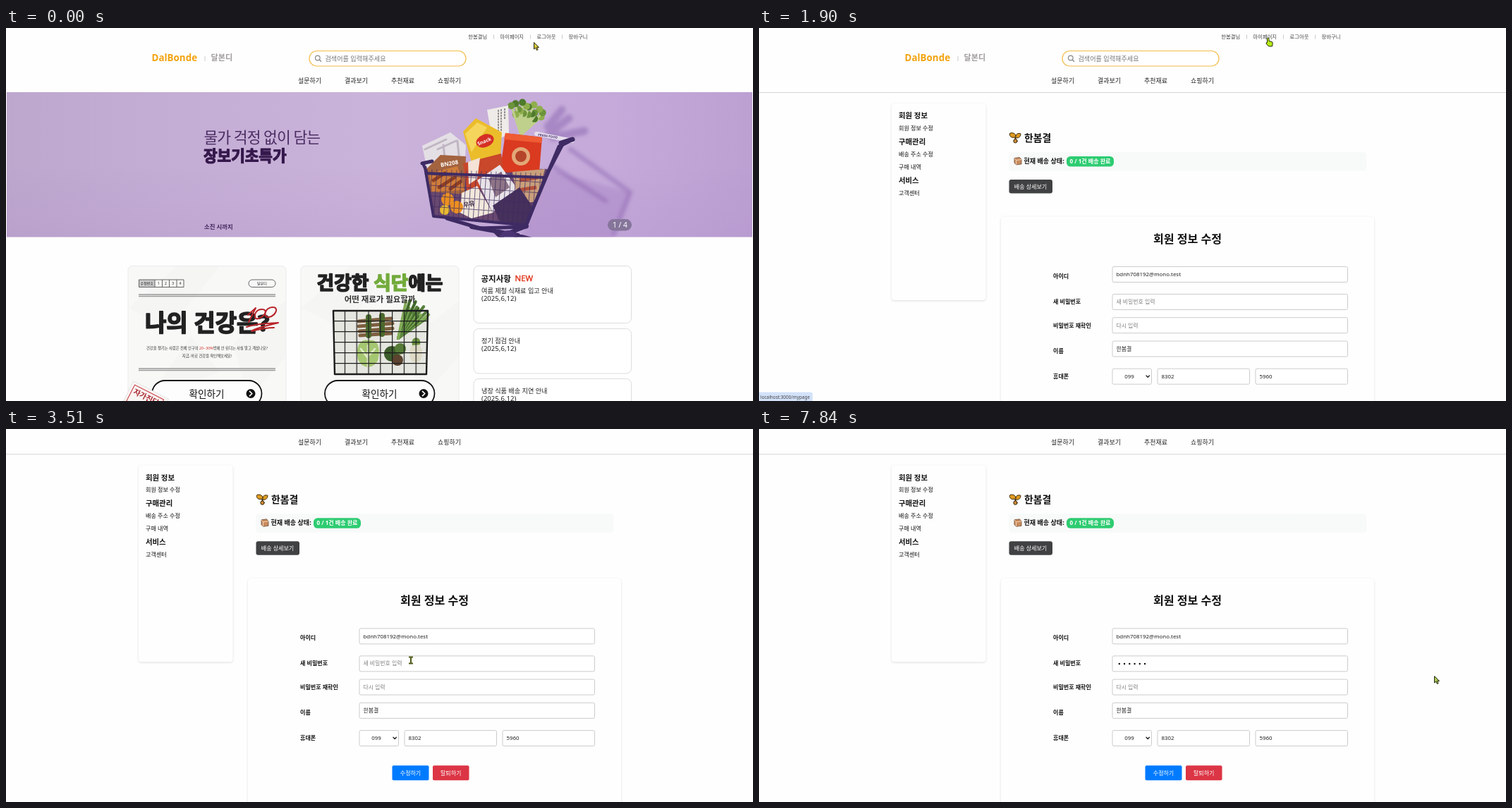
Write an HTML page that moves like this. It is 1059 by 529 pixels and loops after 8 s.

```html
<!DOCTYPE html>
<html lang="ko">
<head>
<meta charset="utf-8">
<style>
html, body { margin: 0; width: 100%; height: 100%; overflow: hidden; background: #fefefe; }
svg { display: block; width: 1059px; height: 529px; font-family: "Noto Sans", "Noto Sans CJK KR", sans-serif; }
.b { font-weight: 700; }
.mid { text-anchor: middle; }
.black { font-weight: 900; stroke-width: 1.7; stroke-linejoin: round; }
.field { fill: #fff; stroke: #ccc; }
.line { fill: none; stroke-linecap: round; stroke-linejoin: round; }
.soft { fill: #fefefe; filter: drop-shadow(0 1px 1.5px rgba(0, 0, 0, .13)); }
</style>
</head>
<body>
<svg viewBox="0 0 1059 529">
<defs>
  <linearGradient id="lilac">
    <stop offset="0" stop-color="#bda7cd"/><stop offset=".2" stop-color="#c3add4"/>
    <stop offset=".5" stop-color="#cab3da"/><stop offset=".8" stop-color="#c5aada"/><stop offset="1" stop-color="#bca0d2"/>
  </linearGradient>
  <linearGradient id="floor" x2="0" y2="1">
    <stop offset=".5" stop-color="#9a72bd" stop-opacity="0"/><stop offset="1" stop-color="#9a72bd" stop-opacity=".12"/>
  </linearGradient>
  <pattern id="bars" width="7" height="15" patternUnits="userSpaceOnUse" patternTransform="rotate(4)">
    <path d="M0 0V15M0 0H7" stroke="#3d2a5e" stroke-width="2" fill="none"/>
  </pattern>
  <pattern id="wires" x="463" y="400" width="16.8" height="15" patternUnits="userSpaceOnUse">
    <path d="M0 0V15M0 0H17" stroke="#1c1c1c" stroke-width="2.4" fill="none"/>
  </pattern>
  <filter id="blur"><feGaussianBlur stdDeviation="2.5"/></filter>
  <clipPath id="bannerClip"><path d="M1 91H1058V296.5H1Z"/></clipPath>
  <g id="paper">
    <rect x=".5" y=".5" width="224" height="220" rx="6" fill="#f8f8f7" stroke="#ebebeb"/>
    <path d="M1 60 70 1H130L60 90ZM150 110 224 50V130L170 190ZM20 200 90 100 130 150Z" fill="#f3f3f2" opacity=".6"/>
    <rect x="34.5" y="163" width="155.5" height="37" rx="18.5" fill="#fdfdfd" stroke="#111" stroke-width="1.8"/>
    <text x="112" y="186.5" font-size="13.6" class="mid" fill="#111">확인하기</text>
    <circle cx="174.5" cy="181.5" r="6.500" fill="#111"/>
    <path d="M173 178.3 176.3 181.5 173 184.7" class="line" stroke="#fff" stroke-width="1.7"/>
  </g>
</defs>

<g id="scroller">
  <g id="header">
    <g font-size="7.3" fill="#444">
      <text x="655.3" y="15">한봄결님</text><text x="700.5" y="15">마이페이지</text>
      <text x="752.5" y="15">로그아웃</text><text x="797.5" y="15">장바구니</text>
    </g>
    <path d="M691.5 9.5V15.5M743.5 9.5V15.5M788.5 9.5V15.5M282 40V47" stroke="#ccc"/>
    <text x="206.5" y="46.5" font-size="13.4" class="b" fill="#f2a30f">DalBonde</text>
    <text x="290.5" y="46.3" font-size="11.1" class="b" fill="#a09b9b">달본디</text>
    <rect x="430" y="32.5" width="222" height="21.5" rx="10.7" fill="#fff" stroke="#f3bd4b" stroke-width="1.2"/>
    <circle cx="441.8" cy="42.5" r="3.3" fill="none" stroke="#888" stroke-width="1.2"/>
    <path d="M444.2 45 447 47.8" stroke="#888" stroke-width="1.3"/>
    <text x="452.5" y="46.7" font-size="9.1" fill="#757575">검색어를 입력해주세요</text>
    <g font-size="8.95" fill="#222">
      <text x="414" y="77.7">설문하기</text><text x="480" y="77.7">결과보기</text>
      <text x="546" y="77.7">추천재료</text><text x="612" y="77.7">쇼핑하기</text>
    </g>
  </g>

  <g id="home">
    <g clip-path="url(#bannerClip)">
      <rect x="1" y="91" width="1057" height="206" fill="url(#lilac)"/>
      <rect x="1" y="91" width="1057" height="206" fill="url(#floor)"/>
      <g filter="url(#blur)" class="line" stroke="#8a63b0">
        <path d="M765 200 885 233 858 300H730Z" fill="#9670b8" stroke="none" opacity=".28"/>
        <path d="M800 172 885 233 862 292M775 196 850 245" stroke-width="7" opacity=".45"/>
        <path d="M770 150 798 128M768 140 788 116M775 155 820 146" stroke-width="11" opacity=".5"/>
      </g>
      <path d="M592 196 768 200 738 280 606 267Z" fill="#69486f"/>
      <g id="celery" class="line"></g>
      <path d="M682 116 712 110 713 150 690 162Z" fill="#eeebe8"/>
      <path d="M698 116V146M702 115V146M707 114V130" stroke="#777" stroke-width="1.5" stroke-dasharray="3 1"/>
      <path d="M590 167 630 148 652 166 650 202 600 214Z" fill="#e4dfe5"/>
      <path d="M594 172 624 158M612 172 638 160M620 166 624 202M640 160 644 200" class="line" stroke="#c0b6c3" stroke-width="3"/>
      <path d="M648 147 666 128 703 148 701 180 660 190Z" fill="#ebbd2b"/>
      <path d="M651 150 668 134 682 141 660 176Z" fill="#f5d55c"/>
      <ellipse cx="679" cy="160" rx="13" ry="9" fill="#d52f25" transform="rotate(-22 679 160)"/>
      <text transform="translate(679 163) rotate(-22)" font-size="7" class="b mid" fill="#fff">Snack</text>
      <path d="M708 149 760 155 756 204 700 205Z" fill="#d93a20"/>
      <path d="M708 149 760 155 759 163 706 158Z" fill="#ef5b32"/>
      <circle cx="730" cy="182" r="13" fill="#e3a878"/><circle cx="730" cy="182" r="8" fill="#b5452a"/>
      <path d="M596 200 616 180 652 182 650 236 602 232Z" fill="#a4633f"/>
      <path d="M600 206 640 196 650 230 604 232Z" fill="#cf7c3a"/>
      <path d="M606 216 622 206M614 226 636 212M630 228 644 218" class="line" stroke="#8f3f22" stroke-width="5"/>
      <text transform="translate(629 195) rotate(-10)" font-size="8" class="b mid" fill="#fff">BN208</text>
      <path d="M648 192 702 178 706 206 655 242Z" fill="#c9472b"/>
      <path d="M655 190 672 184 668 214 656 222Z" fill="#f4e3d6"/>
      <path d="M668 216 700 194 728 232 690 262Z" fill="#e9e3e8"/>
      <path d="M684 214 702 204 714 226 694 240Z" fill="#8d7486"/>
      <path d="M718 204 764 200 752 246 726 250Z" fill="#c99f7c"/>
      <path d="M728 216 754 212M726 230 752 226" stroke="#b3503a" stroke-width="5"/>
      <path d="M690 252 728 226 748 256 736 280 700 274Z" fill="#46305c"/>
      <path d="M646 234 668 224 690 262 660 270 644 262Z" fill="#f1e8dc"/>
      <text transform="translate(657 253) rotate(-12)" font-size="9" class="b mid" fill="#3a2a46">우유</text>
      <g fill="#ec8f22"><circle cx="626" cy="243" r="9"/><circle cx="639" cy="254" r="9"/><circle cx="622" cy="258" r="7" fill="#e9b931"/></g>
      <path d="M592 200 765 206 738 278 606 266Z" fill="url(#bars)" opacity=".72"/>
      <g class="line" stroke="#3e2b64">
        <path d="M591 192 597 206 765 212 790 164M594 198 606 267 738 280 768 203" stroke-width="4"/>
        <path d="M590 192 604 189M736 282 784 168 802 159M625 270 672 284 738 282" stroke-width="5"/>
        <path d="M660 282 726 294M738 281 712 291 746 300M690 285 704 299" stroke-width="6"/>
        <path d="M752 150 803 160" stroke="#e6dfed" stroke-width="6"/><path d="M787 163 803 158" stroke-width="7"/>
      </g>
      <circle cx="712" cy="300" r="13" fill="#4b3474"/>
      <text transform="translate(754 153) rotate(8)" font-size="4.5" class="b" fill="#4b3474">FRESH FOOD</text>
      <text x="280.5" y="162.500" font-size="21.5" letter-spacing="-.95" font-weight="300" fill="#4a2c62">물가 걱정 없이 담는</text>
      <text x="280" y="189" font-size="21.3" class="black" fill="#35184c" stroke="#35184c" style="stroke-width:1.2">장보기초특가</text>
      <text x="281" y="284.8" font-size="8.4" class="b" fill="#43265c">소진 시까지</text>
      <rect x="853" y="271" width="34" height="16.5" rx="8.2" fill="#85759a"/>
      <text x="870.5" y="283" font-size="10.3" class="mid" fill="#fff">1 / 4</text>
    </g>

    <use href="#paper" x="172.5" y="337"/>
    <path d="M188.5 357H211V367.5H188.5Z" fill="#ccc"/>
    <path d="M188.5 357H252V367.5H188.5ZM211 357V367.5M221.5 357V367.5M231.5 357V367.5M242 357V367.5" fill="none" stroke="#555" stroke-width=".9"/>
    <g font-size="5" class="mid" fill="#222">
      <text x="199.8" y="364">수험번호</text><text x="216.3" y="364">1</text><text x="226.5" y="364">2</text>
      <text x="236.7" y="364">3</text><text x="247" y="364">4</text>
      <rect x="344" y="357" width="38" height="10.5" rx="5.2" fill="none" stroke="#555" stroke-width=".9"/>
      <text x="363" y="364">달본디</text>
    </g>
    <path d="M188 378H382M188 380.5H382M188 483H382M188 485.5H382" stroke="#999" stroke-width="1.3"/>
    <text x="197" y="430" font-size="33" class="black" fill="#222" stroke="#222">나의 건강은?</text>
    <g class="line" stroke="#b8242a" stroke-width="2">
      <path d="M343 407 354 397 344 417M363 399C352 398 349 415 358 412S372 399 363 399M378 396C366 396 364 412 373 410S388 396 378 396"/>
      <path d="M341 424C355 419 370 419 386 418 370 422 352 426 348 430 360 427 370 425 380 425"/>
    </g>
    <g font-size="5.3" class="mid" fill="#333">
      <text x="285" y="456">건강을 챙기는 사람은 전체 인구의 <tspan fill="#d0342c">20~30%</tspan>밖에 안 된다는 사실 알고 계셨나요?</text>
      <text x="285" y="467">지금, 바로 건강을 확인해보세요!</text>
    </g>
    <g transform="translate(183 503) rotate(27)">
      <rect x="-3" y="-1" width="56" height="50" fill="#f9f5f3" stroke="#ddd" stroke-width=".6"/>
      <rect x="1" y="3" width="46" height="40" fill="none" stroke="#c5333a"/>
      <text x="4" y="15" font-size="10.5" class="b" fill="#a8262e">자가진단</text>
    </g>

    <use href="#paper" x="417.5" y="337"/>
    <text x="530" y="371.3" font-size="26.7" class="black mid" fill="#222" stroke="#222">건강한 <tspan fill="#73ab3c" stroke="#73ab3c">식단</tspan>에는</text>
    <g class="line">
      <path d="M464 401H598L596 491H466Z" fill="#e6e6e0"/>
      <path d="M500 416 546 412M500 423 548 419M501 430 548 426M502 436 546 433" stroke="#7d5f3f" stroke-width="5"/>
      <path d="M514 410V436M533 408V434" stroke="#4c6a2d" stroke-width="8"/>
      <g id="scallions" stroke-width="4"></g>
      <path d="M499 470C494 450 504 440 514 443 527 440 532 454 527 472 520 484 505 484 499 470Z" fill="#a6c772"/>
      <path d="M513 480V450M513 468 503 455M513 466 523 455" stroke="#e4edcb" stroke-width="2.5"/>
      <circle cx="547" cy="462" r="11" fill="#3d5c2b"/><circle cx="559" cy="455" r="8" fill="#577b38"/><circle cx="555" cy="471" r="8" fill="#5b4330"/>
      <ellipse cx="581" cy="461" rx="9" ry="14" fill="#dedac5"/><path d="M576 450C572 436 590 436 587 449" fill="#6a9140"/>
      <path d="M464 401H598L596 491H466Z" fill="url(#wires)" stroke="#1c1c1c" stroke-width="2.4"/>
    </g>
    <text x="530" y="388.6" font-size="11.45" class="b mid" fill="#333">어떤 재료가 필요할까</text>

    <g class="field" style="stroke:#ddd">
      <rect x="663" y="337.5" width="223.5" height="81" rx="7"/><rect x="663" y="426.5" width="223.5" height="63.5" rx="7"/>
      <rect x="663" y="497.5" width="223.5" height="63.5" rx="7"/>
    </g>
    <text x="673.5" y="359.6" font-size="11.5" class="b" fill="#111">공지사항</text>
    <text x="721.5" y="359.4" font-size="11.4" fill="#e1361d" stroke="#e1361d" stroke-width=".4">NEW</text>
    <g font-size="9.15" fill="#222">
      <text x="674" y="376">여름 제철 식재료 입고 안내</text><text x="674" y="446.5">정기 점검 안내</text><text x="674" y="517.8">냉장 식품 배송 지연 안내</text>
      <g font-size="9.6"><text x="674" y="387.3">(2025,6,12)</text><text x="674" y="457.8">(2025,6,12)</text><text x="674" y="529">(2025,6,12)</text></g>
    </g>
  </g>

  <g id="account" fill="#111">
    <path d="M0 91.5H1059" stroke="#d4d6d6"/>
    <rect x="188" y="107" width="133.5" height="279" rx="4" class="soft"/>
    <g font-size="10.4" class="b">
      <text x="198" y="128.2">회원 정보</text><text x="198" y="164.8">구매관리</text><text x="198" y="219.8">서비스</text>
    </g>
    <g font-size="8.1">
      <text x="198" y="144.7">회원 정보 수정</text><text x="198" y="181.6">배송 주소 수정</text>
      <text x="198" y="199.9">구매 내역</text><text x="198" y="236.5">고객센터</text>
    </g>
    <g class="line" stroke="#3a2a12">
      <path d="M363 155C356 157 354 151 356 149 361 148 364 150 364 154 364 149 369 149 371 150 371 155 367 157 364 155.5Z" fill="#dd9a22"/>
      <path d="M363.5 155.5V158" stroke-width="2"/><circle cx="363.5" cy="160.3" r="2.7" fill="#c98a35"/>
    </g>
    <text x="376" y="161" font-size="13.9" class="b">한봄결</text>
    <rect x="354" y="176" width="507" height="26.5" rx="4" fill="#f8f9f9"/>
    <path d="M362 184.5 369.5 183.5 372 186.5V193L364.5 194 362 191Z" fill="#c98b5e" stroke="#6a4a35" stroke-width=".8"/>
    <path d="M362 184.5 364.5 187.5 372 186.5M364.5 187.5V194" fill="none" stroke="#f0d3b3"/>
    <text x="375.5" y="192" font-size="9.05" class="b">현재 배송 상태:</text>
    <rect x="436" y="182" width="67" height="14.5" rx="5.5" fill="#2ecc71"/>
    <rect x="354.5" y="215" width="61.5" height="19.5" rx="3" fill="#404142"/>
    <g font-size="8.05" class="mid" fill="#fff">
      <text x="469.5" y="192" class="b">0 / 1건 배송 완료</text><text x="385" y="227.8">배송 상세보기</text>
    </g>
    <rect x="343" y="267.5" width="529" height="330" rx="5" class="soft"/>
    <text x="607.5" y="304.8" font-size="16.1" class="b mid">회원 정보 수정</text>
    <g font-size="8.05" class="b">
      <text x="417" y="354.9">아이디</text><text x="417" y="391">새 비밀번호</text><text x="417" y="424.5">비밀번호 재확인</text>
      <text x="417" y="460.7">이름</text><text x="417" y="496.9">휴대폰</text>
    </g>
    <g class="field">
      <rect x="501" y="338.5" width="333.5" height="22" rx="2"/><rect x="501" y="377.5" width="333.5" height="22" rx="2"/>
      <rect x="501" y="410.7" width="333.5" height="22" rx="2"/><rect x="501" y="444" width="333.5" height="22" rx="2"/>
      <rect x="501" y="483.2" width="55.5" height="22" rx="2"/><rect x="565" y="483.2" width="130.5" height="22" rx="2"/>
      <rect x="704" y="483.2" width="130.5" height="22" rx="2"/>
    </g>
    <g font-size="7.9" fill="#222">
      <text x="506.5" y="352.2">bdnh708192@mono.test</text><text x="506.5" y="458">한봄결</text>
      <text x="525" y="496.8" class="mid">099</text><text x="570.5" y="496.8">8302</text><text x="709.5" y="496.8">5960</text>
      <text x="506.5" y="424.6" fill="#808080">다시 입력</text><text id="hint" x="506.5" y="390.9" fill="#808080">새 비밀번호 입력</text>
    </g>
    <path d="M549 493 551.2 495.2 553.4 493" class="line" stroke="#222" stroke-width="1.4"/>
    <g id="dots"></g>
    <path id="caret" d="M0 384.5V392.8" stroke="#111"/>
    <rect x="547.5" y="533" width="52" height="21" rx="2" fill="#007bff"/><rect x="605" y="533" width="51.5" height="21" rx="2" fill="#dc3545"/>
    <g font-size="8" class="mid" fill="#fff"><text x="573.5" y="546.4">수정하기</text><text x="630.7" y="546.4">탈퇴하기</text></g>
  </g>
</g>

<g id="status">
  <path d="M0 516.5H73Q76 516.5 76 519.5V529H0Z" fill="#d3e2f9"/>
  <text x="2" y="525.5" font-size="6.4" fill="#444">localhost:3000/mypage</text>
</g>
<g id="cursor" stroke="#25280c" stroke-linejoin="round">
  <path id="arrow" d="M0 0V9.5L2.3 7.5 3.9 11 5.6 10.2 4 6.9H7Z"/>
  <path id="hand" d="M3 0Q4.5 0 4.5 1.5V4.5L8.5 5.5Q10 6 9.7 8L9 12H4L.5 8Q0 6.3 2 6.6V1.5Q2 0 3 0Z"/>
  <path id="beam" d="M-3-4.5H3M0-4.5V4.5M-3 4.5H3" stroke="#4f5a16" stroke-width="2"/>
</g>
</svg>

<script>
const LOOP = 8000, KEYS = [5510, 5810, 6110, 6720, 7020, 7320];
const CARET = [[3710, 4200], [4620, 5220], [5510, 6620], [6720, 7840]];
// start, end, number of steps, from, to
const MOVES = [
  [390, 790, 5, [748.5, 20.5], [720, 15]],
  [990, 1290, 4, [718.5, 8], [718.5, 14]],
  [2190, 2720, 6, [722, 15], [610, 249]],
  [3110, 3510, 5, [610, 249], [574, 328]],
  [3900, 4200, 4, [574, 328], [957.5, 350.5]],
];
const el = id => document.getElementById(id);
const show = (id, on) => el(id).style.display = on ? '' : 'none';

// Fan of stalks growing from a root, optionally tipped with leaves
function fan(id, x, y, count, length, from, to, greens, leaf) {
  el(id).innerHTML = Array.from({ length: count }, (_, i) => {
    const angle = (from + (to - from) * i / (count - 1)) * Math.PI / 180;
    const r = length * (.82 + .18 * Math.sin(i * 2.4));
    const dx = r * Math.cos(angle), dy = -r * Math.sin(angle), color = greens[i % greens.length];
    const stalk = `<path d="M${x} ${y}l${dx} ${dy}" stroke="${leaf ? '#bfd08c' : color}" ${leaf ? 'stroke-width="3"' : ''}/>`;
    return leaf ? stalk + `<circle cx="${x + dx}" cy="${y + dy}" r="${leaf}" fill="${color}"/>` : stalk;
  }).join('');
}
fan('celery', 730, 152, 17, 47, 42, 108, ['#8fae4c', '#6c943b', '#4f7a2c'], 5);
fan('scallions', 556, 440, 17, 58, 35, 78, ['#56803a', '#82ab57', '#3f6829']);
el('dots').innerHTML = KEYS.map((_, i) => `<circle cx="${510.8 + 7.25 * i}" cy="388.6" r="1.2"/>`).join('');

function pointer(t) {
  let at = MOVES[0][3];
  for (const [start, end, steps, a, b] of MOVES) {
    if (t < start) break;
    const done = Math.min(steps, Math.floor((t - start) / (end - start) * (steps - 1) + 1.001)) / steps;
    at = a.map((v, i) => v + (b[i] - v) * done);
  }
  return at;
}

function draw() {
  const t = performance.now() % LOOP;
  const scroll = t < 2820 ? 0 : t < 2920 ? 12 : t < 3020 ? 44 : 55.65;
  const [x, y] = pointer(t);
  const hand = t >= 990 && t < 2190, beam = t >= 3400 && x < 835;
  const typed = KEYS.filter(k => k <= t).length;

  el('scroller').setAttribute('transform', `translate(0 ${-scroll})`);
  show('home', t < 1900);
  show('account', t >= 1900);
  show('status', hand);
  show('hint', !typed);
  [...el('dots').children].forEach((dot, i) => dot.style.display = i < typed ? '' : 'none');
  show('caret', CARET.some(([on, off]) => t >= on && t < off));
  el('caret').setAttribute('transform', `translate(${507.5 + 7.2 * typed} 0)`);

  el('cursor').setAttribute('transform', `translate(${x} ${y})`);
  show('arrow', !hand && !beam);
  show('hand', hand);
  show('beam', beam);
  el('arrow').setAttribute('fill', t < 2190 ? '#d9c93c' : t < 3400 ? '#c8e01c' : '#a9c653');
  el('hand').setAttribute('fill', t < 1490 ? '#d9d03c' : '#b5ec14');
  requestAnimationFrame(draw);
}
draw();
</script>
</body>
</html>
```
